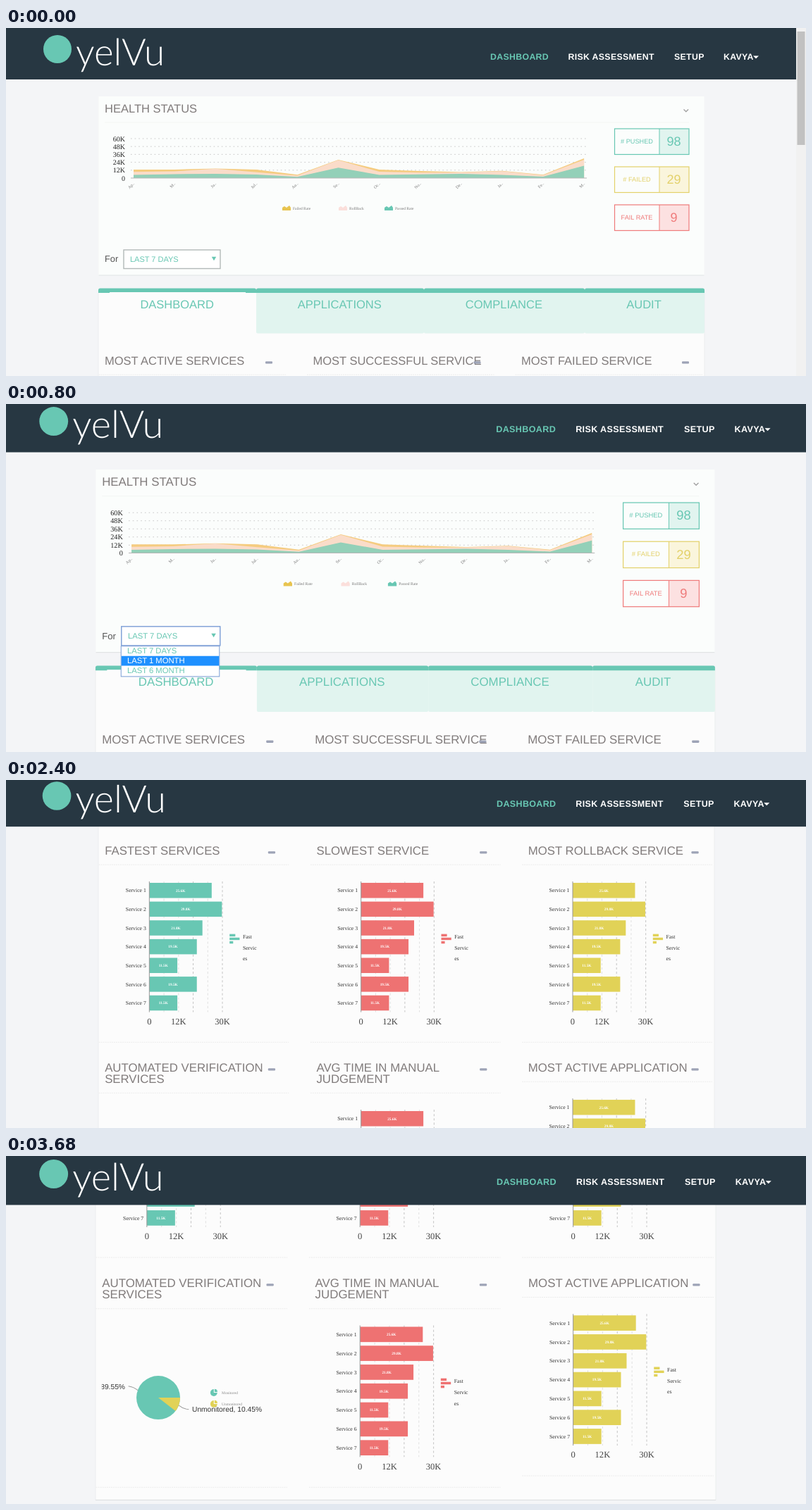
These frames come from a looping animation (1135x494 px, 4 s). An HTML page:

```html
<!DOCTYPE html>
<html lang="en">
<head>
<meta charset="utf-8">
<title>Release dashboard</title>
<style>
  html, body { margin: 0; width: 100%; height: 100%; overflow: hidden; background: #f4f5f7; }
  svg { display: block; width: 100%; height: 100%; }
  text { font-family: "Liberation Sans", Arial, sans-serif; text-rendering: geometricPrecision; }
  .serif { font-family: "Liberation Serif", Times, serif; }
  .nav { font-weight: bold; letter-spacing: .35px; }
  .logo { font-family: Lato, sans-serif; font-weight: 300; }
</style>
</head>
<body>
<svg viewBox="0 0 1135 494" preserveAspectRatio="none">
  <defs><clipPath id="pieClip"><rect x="139.7" y="1100" width="260" height="250"/></clipPath></defs>
  <g id="camera"><g id="page"></g><g id="header"></g></g>
</svg>
<script>
const TEAL = '#68c7b3', RED = '#ee7272', YELLOW = '#e1d257', GREY = '#807b7b', MINT = '#e1f4ef';
const $ = id => document.getElementById(id);

const rect = (x, y, w, h, fill, more = '') =>
  `<rect x="${x}" y="${y}" width="${w}" height="${h}" fill="${fill}" ${more}/>`;
const path = (d, fill, more = '') => `<path d="${d}" fill="${fill}" ${more}/>`;
const line = (x1, y1, x2, y2, stroke, more = '') =>
  path(`M${x1} ${y1}L${x2} ${y2}`, 'none', `stroke="${stroke}" ${more}`);
// y is the middle of the capitals
const text = (x, y, size, str, fill, anchor = 'start', more = '') =>
  `<text x="${x}" y="${y + size * .35}" font-size="${size}" fill="${fill}" text-anchor="${anchor}" ${more}>${str}</text>`;
const serif = (x, y, size, str, fill, anchor, more = '') =>
  text(x, y, size, str, fill, anchor, `class="serif" ${more}`);

// Header
function header() {
  const nav = [[687, 'DASHBOARD'], [797.5, 'RISK ASSESSMENT'], [948, 'SETUP'], [1018, 'KAVYA']];
  return rect(-20, -20, 1141, 93, '#273742') +
    `<circle cx="73" cy="30" r="20" fill="${TEAL}"/>` +
    '<text x="99" y="53" font-size="53" fill="#fff" class="logo">yelVu</text>' +
    nav.map(([x, s], i) => text(x, 41, 12.3, s, i ? '#fff' : TEAL, 'start', 'class="nav"')).join('') +
    path('M1060 39.5h8l-4 4z', '#fff') +
    rect(1121, 0, 14, 494, '#f1f1f1') + rect(1122.5, 5, 11, 161, '#c1c1c1');
}

// Health status
function areaChart() {
  const px = i => 181 + i * 58.1;
  const area = (ys, fill) =>
    path(`M${px(0)} 213` + ys.map((y, i) => `L${px(i)} ${y}`).join('') + `L${px(11)} 213z`, fill);
  const months = 'Ap.. M.. Ju.. Jul.. Au.. Se.. Oc.. No.. De.. Ja.. Fe.. M..'.split(' ');
  const legend = [[392, '#e8c44f', 'Failed Rate'], [472, '#fbdfdb', 'RollBack'], [537, TEAL, 'Passed Rate']];
  let s = '';
  for (let k = 0; k < 6; k++) {
    const y = 213 - k * 11.2;
    s += serif(169, y, 10, k ? k * 12 + 'K' : '0', '#222', 'end') +
      (k ? line(177, y, 824, y, '#c8c8c8', 'stroke-dasharray="1.6 4"') : '');
  }
  s += area([201, 201, 199.5, 201, 208.3, 187, 201, 203, 204.5, 202.8, 208.3, 185], '#f5cc80') +
    area([204.3, 203.5, 199.7, 204.8, 209.5, 187.6, 204, 205.3, 205, 203.3, 209, 187], '#fadcc9') +
    area([208.5, 207.5, 207, 208, 211.3, 198.3, 208.5, 207.8, 207, 208.5, 211, 195.5], '#93d0b8') +
    line(177, 213, 824, 213, '#b5b5b5');
  months.forEach((m, i) => {
    s += serif(px(i), 220, 6, m, '#777', 'end', `transform="rotate(-45 ${px(i)} 220)"`);
  });
  for (const [x, c, name] of legend)
    s += path(`M${x} 259v-4l3-2 3 2 4-3 2 3v4z`, c) + serif(x + 15, 256, 5.5, name, '#777');
  return s;
}

function badge(y, name, value, color, tint) {
  return rect(927, y, 42, 36.5, tint) +
    rect(863.5, y, 105.5, 36.5, 'none', `stroke="${color}" stroke-width="1.2"`) +
    line(927, y, 927, y + 36.5, color) +
    text(895, y + 17.5, 9.2, name, color, 'middle') + text(947.5, y + 17.5, 18, value, color, 'middle');
}

function dropdown() {
  const items = ['LAST 7 DAYS', 'LAST 1 MONTH', 'LAST 6 MONTH'];
  return '<g id="menu">' + rect(166.5, 342.3, 136.5, 42.2, '#fff', 'stroke="#7d9fd6"') +
    rect(167, 356, 135.5, 13.5, '#1e90ff') +
    items.map((s, i) => text(175, 348.5 + i * 13.7, 11, s, i == 1 ? '#fff' : TEAL)).join('') + '</g>';
}

function health() {
  return rect(131.5, 97, 859, 254, '#fbfdfc') + line(131.5, 351, 990.5, 351, '#e1e4e5') +
    text(140, 114, 16.5, 'HEALTH STATUS', GREY) + line(140, 134, 969, 134, '#f3f5f4') +
    path('M961.5 115.5l3.3 3.3 3.3-3.3', 'none', 'stroke="#a0a0a0" stroke-width="1.3"') +
    areaChart() +
    badge(143, '# PUSHED', 98, TEAL, MINT) +
    badge(197, '# FAILED', 29, '#e3d16a', '#faf5dc') +
    badge(251, 'FAIL RATE', 9, '#ef7b7b', '#fce1e1') +
    text(140, 328, 12.8, 'For', '#555') +
    rect(167, 315, 137, 26.5, '#fff', 'id="select" stroke-width="1.4"') +
    text(176, 328, 11, 'LAST 7 DAYS', TEAL) + path('M291.8 324.8h6.4l-3.2 5.4z', TEAL);
}

// Tabs
function tabs() {
  const edges = [131, 355, 593, 821, 991];
  const names = [[242.7, 'DASHBOARD'], [473.3, 'APPLICATIONS'], [706.4, 'COMPLIANCE'], [905, 'AUDIT']];
  return rect(131, 373, 860, 1006, '#fcfcfc', 'stroke="#eceeef"') +
    line(131, 1379.5, 991, 1379.5, '#dfe1e2') +
    names.map(([x, s], i) => {
      const l = edges[i], w = edges[i + 1] - l;
      return (i ? rect(l, 372, w, 61.5, MINT, 'rx="2"') : '') +
        path(`M${l} 376v-4q0-2.5 2.5-2.5h${w - 5}q2.5 0 2.5 2.5v4z`, TEAL) +
        (i ? '' : rect(147, 375, 193, 2, '#fcfcfc')) +
        text(x, 392, 16.5, s, TEAL, 'middle');
    }).join('');
}

// Service cards
const PASSED = [17, 19.8, 12.5, 14.5, 10, 12.5, 16.5];
const FAILED = [25.6, 29.8, 21.8, 19.5, 11.5, 19.5, 11.5];

function barLegend(x, y, name, color) {
  const shift = name == 'Passed' ? 0 : 3;
  return [8, 14, 5].map((w, i) => rect(x + 109 + shift, y + i * 5 - 4, w, 3.4, color)).join('') +
    [name, 'Servic', 'es'].map((s, i) => serif(x + 127.4 + shift, y + i * 15.2, 7.6, s, '#333')).join('');
}

// sets: [legend name, colour, values] stacked from left to right
function barChart(x, y, max, mid, sets) {
  const W = 102, top = y + 55.8;
  let s = '';
  for (let k = 1; k <= 5; k++)
    s += line(x + W * k / 5, top - 12.5, x + W * k / 5, top + 170,
      k == 3 || k == 5 ? '#c4c4c4' : '#e0e0e0', 'stroke-dasharray="3 3"');
  for (let i = 0; i < 7; i++) {
    const cy = top + i * 26.2;
    let bx = x;
    s += serif(x - 4.5, cy, 7.6, 'Service ' + (i + 1), '#333', 'end');
    for (const [, color, values] of sets) {
      const w = values[i] / max * W;
      s += rect(bx, cy - 10.6, w, 21.2, color) +
        serif(bx + w / 2, cy, 5.2, values[i] + 'K', '#fff', 'middle', 'font-weight="bold"');
      bx += w;
    }
  }
  s += line(x, top - 12.5, x, top + 170, '#999');
  [[0, '0'], [.4, mid + 'K'], [1, max + 'K']].forEach(([f, label]) => {
    s += serif(x + W * f, y + 238.4, 12.3, label, '#444', 'middle');
  });
  const first = sets.length > 1 ? 98.7 : 120.7;
  return s + sets.map(([name, color], i) => barLegend(x, y + first + i * 44.2, name, color)).join('');
}

function card(col, y, title, sets, max = 30, mid = 12) {
  const dx = col * 295.5, lines = title.split('|'), drop = (lines.length - 1) * 15.8;
  return lines.map((s, i) => text(140 + dx, y + i * 15.8, 16.5, s, GREY)).join('') +
    rect(368 + dx, y + 1.3, 10, 3.2, '#9da3b6', 'rx="1"') +
    [20, 267.8].map(h => line(131.5 + dx, y + h + drop, 397 + dx, y + h + drop, '#ececec',
      'stroke-dasharray="2 1"')).join('') +
    (sets ? barChart(202.2 + dx, y + drop, max, mid, sets) : '');
}

function pie() {
  const cx = 218, cy = 1237.3;
  const slice = (x, y, r) => {
    const a = Math.PI * 2 * .1045;
    return `<circle cx="${x}" cy="${y}" r="${r}" fill="${TEAL}"/>` +
      path(`M${x} ${y}h${r}A${r} ${r} 0 0 1 ${x + r * Math.cos(a)} ${y + r * Math.sin(a)}z`, YELLOW);
  };
  const icon = (y, color, name) =>
    `<circle cx="295" cy="${y}" r="4.8" fill="${color}"/>` +
    path(`M295 ${y}v-5h5v5z`, '#fcfcfc') + path(`M296 ${y - 1}v-4a4 4 0 0 1 4 4z`, color) +
    serif(306, y, 5.3, name, '#888');
  return '<g clip-path="url(#pieClip)">' + slice(cx, cy, 30.3) +
    path('M189.6 1227.2q-6-5-13-5.8', 'none', 'stroke="#999"') +
    path('M246.3 1248q6 5 14 5.7', 'none', 'stroke="#999"') +
    text(172, 1221.7, 10, 'Monitored, 89.55%', '#333', 'end') +
    `<g transform="translate(0 ${-6.2})">` + icon(1236.6, TEAL, 'Monitored') + icon(1252.2, YELLOW, 'Unmonitored') + '</g>' +
    text(264.9, 1253.6, 10, 'Unmonitored, 10.45%', '#333') + '</g>';
}

function cards() {
  const pass = ['Passed', TEAL, PASSED], fail = ['Failed', RED, FAILED];
  const fast = color => [['Fast', color, FAILED]];
  return card(0, 472, 'MOST ACTIVE SERVICES', [pass, fail], 50, 20) +
    card(1, 472, 'MOST SUCCESSFUL SERVICE', [pass], 20, 8) +
    card(2, 472, 'MOST FAILED SERVICE', [fail]) +
    card(0, 775, 'FASTEST SERVICES', fast(TEAL)) +
    card(1, 775, 'SLOWEST SERVICE', fast(RED)) +
    card(2, 775, 'MOST ROLLBACK SERVICE', fast(YELLOW)) +
    card(0, 1078, 'AUTOMATED VERIFICATION|SERVICES') + pie() +
    card(1, 1078, 'AVG TIME IN MANUAL|JUDGEMENT', fast(RED)) +
    card(2, 1078, 'MOST ACTIVE APPLICATION', fast(YELLOW));
}

$('page').innerHTML = health() + tabs() + cards() + dropdown();
$('header').innerHTML = header();

// Camera offset and zoom, page scroll, open menu
const SHOTS = [
  { x: 0, y: 0, zoom: 1, scroll: 0 },
  { x: -6.9, y: -6.1, zoom: 1.022, scroll: 0, open: true },
  { x: -.14, y: -2.7, zoom: 1.0163, scroll: 278.5 },
  { x: -2.14, y: -8, zoom: 1.0163, scroll: 668.7 },
  { x: -7.05, y: -5.2, zoom: 1.0233, scroll: 897 }
];
const HOLD = 800;

function draw(now) {
  const { x, y, zoom, scroll, open } = SHOTS[Math.floor(now / HOLD) % SHOTS.length];
  $('camera').setAttribute('transform', `translate(${x} ${y}) scale(${zoom})`);
  $('page').setAttribute('transform', `translate(0 ${-scroll})`);
  $('menu').setAttribute('visibility', open ? 'visible' : 'hidden');
  $('select').setAttribute('stroke', open ? '#7d9fd6' : '#b3b9b8');
  requestAnimationFrame(draw);
}
draw(performance.now());
</script>
</body>
</html>
```
